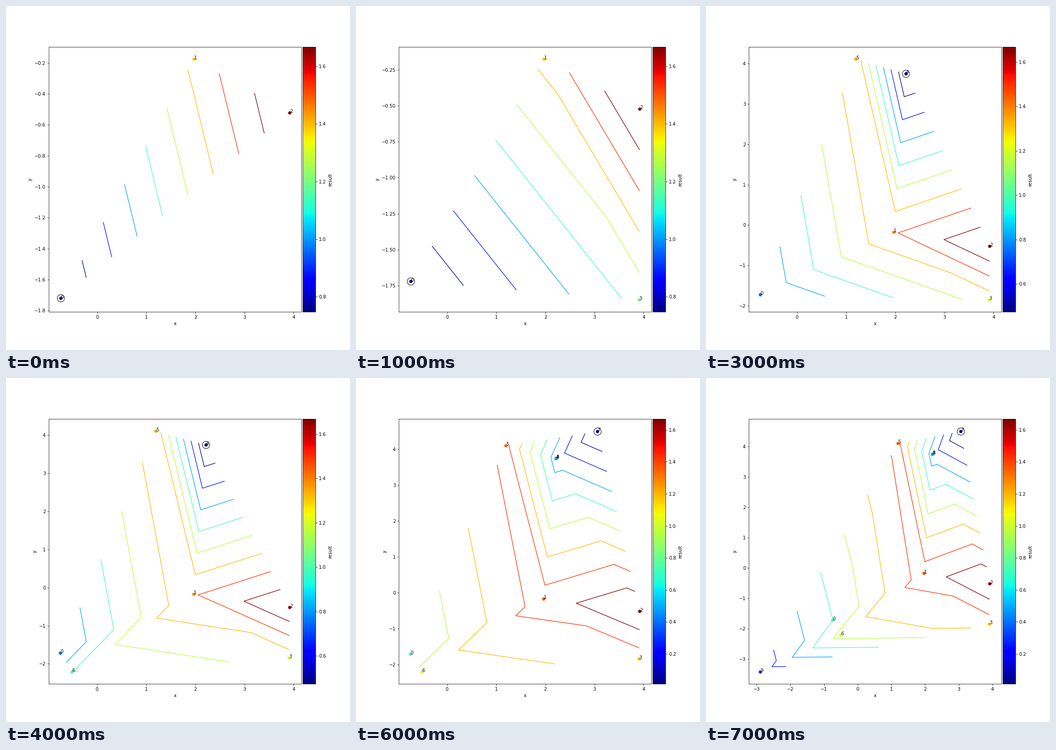
Write a matplotlib script that moves like this. It is 748 px wide and 748 px high and loops after 8000 ms.

```python
import matplotlib.pyplot as plt
import numpy as np
from matplotlib.animation import FuncAnimation
from mpl_toolkits.axes_grid1 import make_axes_locatable

SIZE, DPI = 748, 72
START, STEPS = 3, 8
RING_PAD = 0.011  # extra room the ring adds to the data limits
NUDGE = 0.3 / SIZE  # keeps the axes edges on the intended pixels

# Samples in the order they are found: x, y, result
SAMPLES = np.array([
    (-0.744, -1.721, 0.746),
    (1.968, -0.176, 1.389),
    (3.920, -0.523, 1.667),
    (3.908, -1.850, 1.189),
    (2.218, 3.740, 0.473),
    (1.199, 4.102, 1.355),
    (-0.505, -2.214, 0.998),
    (3.062, 4.497, 0.012),
    (2.222, 3.744, 0.473),
    (-2.890, -3.428, 0.276),
])

fig = plt.figure(figsize=(SIZE / DPI, SIZE / DPI), dpi=DPI, facecolor="white")
fig.subplots_adjust(left=0.125 - NUDGE, right=0.9 - NUDGE,
                    bottom=0.11 + NUDGE, top=0.88 + NUDGE)


def limits(values, best):
    low = min(values.min(), values[best] - RING_PAD)
    high = max(values.max(), values[best] + RING_PAD)
    margin = 0.05 * (high - low)
    return low - margin, high + margin


def draw(step):
    x, y, z = SAMPLES[:START + step].T
    best = z.argmin()

    fig.clf()
    ax = fig.add_subplot()
    cax = make_axes_locatable(ax).append_axes("right", size="5%", pad=0.05)

    levels = np.linspace(z.min(), z.max(), 10)[1:-1]
    ax.tricontour(x, y, z, levels=levels, cmap="jet", linewidths=1.3)
    dots = ax.scatter(x, y, c=z, cmap="jet")
    ax.scatter(x[best], y[best], s=250, facecolors="none", edgecolors="black")
    for i, point in enumerate(zip(x, y)):
        ax.annotate(str(i), point)

    ax.set(xlabel="x", ylabel="y", xlim=limits(x, best), ylim=limits(y, best))
    fig.colorbar(dots, cax=cax, label="result")
    return []


anim = FuncAnimation(fig, draw, frames=STEPS, interval=1000,
                     repeat=True, repeat_delay=0)
plt.show()
```
